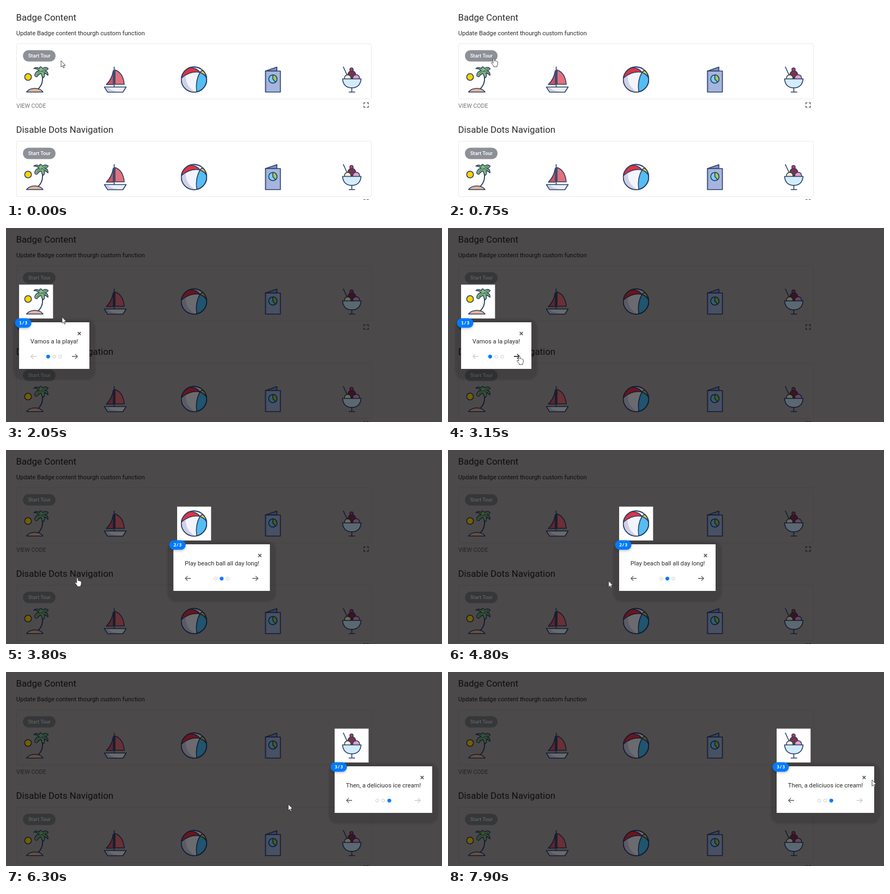
An HTML page that plays this animation: 800x358 px, repeating every 8000 ms.

```html
<!DOCTYPE html>
<html lang="en">
<head>
<meta charset="utf-8">
<title>Guided tour</title>
<style>
  html, body { margin: 0; width: 100%; height: 100%; overflow: hidden; background: #fff; }
  svg { display: block; font-family: Roboto, Arial, sans-serif; }
  text { fill: #2c2c2e; }
  .h { font-size: 16.8px; }
  .p { font-size: 11.2px; }
  .code { font-size: 10.5px; fill: #757575; }
  .card { fill: #fff; stroke: #ebebeb; }
  .pill { fill: #8d9097; }
  .label { fill: #fff; font-size: 9.33px; font-weight: 500; text-anchor: middle; }
  .line { fill: none; stroke: #4a4a4a; stroke-width: 1.2; }
  .ink { stroke: #2b3f66; stroke-width: 1.6; stroke-linejoin: round; stroke-linecap: round; }

  /* One 8 s timeline drives everything */
  .icon, .btn, #mask, #tour, .step, #cursor, #cursor g, .hover { animation: 8s step-end infinite; }
  .icon { --dim: brightness(.44) saturate(1.15); animation-name: dim; }
  .btn { --dim: brightness(.38); animation-name: dim; }
  .icon.first { animation-name: dim-first; }
  .icon.second { animation-name: dim-second; }
  .icon.third { animation-name: dim-third; }
  @keyframes dim { 0% { filter: none } 11.875%, 100% { filter: var(--dim) } }
  @keyframes dim-first { 0% { filter: none } 44.6875%, 100% { filter: var(--dim) } }
  @keyframes dim-second {
    0% { filter: none } 11.875% { filter: var(--dim) }
    44.6875% { filter: none } 74.6875%, 100% { filter: var(--dim) }
  }
  @keyframes dim-third {
    0% { filter: none } 11.875% { filter: var(--dim) } 74.6875%, 100% { filter: none }
  }

  #mask { fill: rgba(5, 0, 4, .714); fill-rule: evenodd; animation-name: mask; }
  @keyframes mask {
    0% { visibility: hidden; transform: none }
    11.875% { visibility: visible; transform: none }
    44.6875% { visibility: visible; transform: translateX(290px) }
    74.6875%, 100% { visibility: visible; transform: translateX(579px) }
  }

  #tour { animation-name: slide; animation-timing-function: ease; }
  @keyframes slide {
    0%, 44.5% { transform: translate(24px, 174px) }
    48.25%, 74.5% { transform: translate(314px, 174px) }
    78.25%, 100% { transform: translate(603px, 174px) }
  }
  .step { visibility: hidden; }
  .step:nth-child(1) { animation-name: step1; }
  .step:nth-child(2) { animation-name: step2; }
  .step:nth-child(3) { animation-name: step3; }
  @keyframes step1 { 11.875% { visibility: visible } 44.375%, 100% { visibility: hidden } }
  @keyframes step2 { 44.375% { visibility: visible } 74.375%, 100% { visibility: hidden } }
  @keyframes step3 { 74.375%, 100% { visibility: visible } }

  .shade { width: calc((var(--w) + 22) * 1px); fill: #000; opacity: .12; filter: blur(1.5px); }
  .panel { width: calc(var(--w) * 1px); fill: #fff; }
  .end { transform: translateX(calc(var(--w) * 1px)); }
  .mid { transform: translateX(calc(var(--w) * .5px)); }
  .arrow { fill: none; stroke: #5e5e5e; stroke-width: 1.3; }
  .off { stroke: #caccce; }
  .hover { animation-name: hover1; }
  .step:nth-child(2) .hover { animation-name: hover2; }
  @keyframes hover1 { 39.375%, 100% { stroke: #000 } }
  @keyframes hover2 { 68.75%, 100% { stroke: #000 } }
  .dot { fill: none; stroke: #caccce; }
  .on { fill: #007aff; stroke: #007aff; }
  .badge rect { fill: #007aff; filter: drop-shadow(0 2px 2px rgba(0, 0, 0, .25)); }
  .badge text { fill: #fff; font: bold 8.5px "Noto Sans Mono", monospace; text-anchor: middle; }

  #cursor { animation-name: move; animation-timing-function: ease-in-out; }
  @keyframes move {
    0%, 1.25% { transform: translate(101px, 101px) }
    9.375%, 18.125% { transform: translate(84px, 96px) }
    26.25%, 28.75% { transform: translate(103px, 165px) }
    38.125%, 50% { transform: translate(131px, 236px) }
    54.375%, 55.625% { transform: translate(190px, 238px) }
    65%, 66.25% { transform: translate(425px, 246px) }
    70.625%, 76.875% { transform: translate(464px, 242px) }
    78.75% { transform: translate(518px, 244px) }
    84.375%, 85% { transform: translate(650px, 235px) }
    95%, 96.25% { transform: translate(775px, 212px) }
    98.75%, 100% { transform: translate(778px, 199px) }
  }
  #cursor g { visibility: hidden; }
  #cursor .point { animation-name: point; }
  #cursor .hand { animation-name: hand; }
  #cursor .stop { animation-name: stop; }
  @keyframes point {
    0% { visibility: visible } 5% { visibility: hidden }
    11.875% { visibility: visible } 39.375% { visibility: hidden }
    50% { visibility: visible } 68.75% { visibility: hidden }
    76.875%, 100% { visibility: visible }
  }
  @keyframes hand {
    5% { visibility: visible } 11.875% { visibility: hidden }
    39.375% { visibility: visible } 50% { visibility: hidden }
    68.75% { visibility: visible } 74.375%, 100% { visibility: hidden }
  }
  @keyframes stop { 74.375% { visibility: visible } 76.875%, 100% { visibility: hidden } }
</style>
</head>
<body>
<svg width="800" height="358">
  <defs>
    <g id="palm" class="ink">
      <circle cx="40.5" cy="131" r="6.2" fill="#ffd400"/>
      <path d="M66 126Q70 143 58.5 153.5" fill="none" stroke-width="1.9"/>
      <path d="M37.5 158.7Q43 152 53 152T68 158.7Z" fill="#e6b595"/>
      <path d="M61 119.5Q57 115 51 115.5Q55 111.5 61.5 115.5Q61 112.5 64 112.3Q66 113 67.5 115.5Q72 111 77.5 115.5Q75 119.5 71 119.5Q78 121 77 128Q73 124 70 124Q72 130 68.5 132.5Q65 129 64.5 124.5Q60 125.5 57 130.5Q51 131 53.5 124.5Q56 120 61 119.5Z" fill="#84ba78" stroke-width="1.4"/>
      <path d="M56 127Q60 121 65 120.5L74 115.5M65 120.5Q71 121 74.5 125" fill="none" stroke-width=".8"/>
    </g>
    <g id="boat" class="ink">
      <path d="M197 119Q194 136 184 145H197Z" fill="#cf5466"/>
      <path d="M200 118Q215 123 217 144.5H200Z" fill="#e2717b"/>
      <path d="M198.5 112.5V149" fill="none"/>
      <path d="M180.5 149.5H220.5L214.5 159H186.5Z" fill="#eef0fa"/>
      <path d="M183 150.5L188 158H205Q190 156 187 150.5Z" fill="#c9cbe2" stroke="none"/>
    </g>
    <g id="ball" class="ink">
      <circle cx="345" cy="135.7" r="23.3" fill="#f3f4fc"/>
      <path d="M322 133Q324 127 330 126Q328 148 348 159A23.3 23.3 0 0 1 322 133Z" fill="#cfd0e6" stroke="none"/>
      <path d="M322 133Q338 119 356 122.5Q350 114 337 113.8A23.3 23.3 0 0 0 322 133Z" fill="#dc3545"/>
      <path d="M356 122.5Q347 138 350 158.5A23.3 23.3 0 0 0 368 133Q365 126 356 122.5Z" fill="#55bdf2"/>
      <path d="M356 122.5Q359 118 362.5 120Q367 125 368 132Q365 126 356 122.5Z" fill="#ffd21f"/>
      <circle cx="345" cy="135.7" r="23.3" fill="none"/>
    </g>
    <g id="leaflet" class="ink">
      <path d="M476 120L497 112.7V120Z" fill="#7f93c4"/>
      <path d="M476 120H503.5V158.8H476Z" fill="#a6b5de"/>
      <path d="M477.5 121.5V157.5" stroke="#8498cb" fill="none"/>
      <circle cx="489.6" cy="134.8" r="7.6" fill="#74d0f5"/>
      <path d="M489.6 127.2A7.6 7.6 0 0 1 494.5 140.6L489.6 134.8Z" fill="#a3cc50"/>
    </g>
    <g id="sundae" class="ink">
      <path d="M619 112.5L627 130" fill="none"/>
      <circle cx="634.5" cy="126.5" r="7" fill="#7f3148"/>
      <circle cx="627" cy="133" r="6" fill="#fbf0c4"/>
      <circle cx="642.5" cy="133" r="6.3" fill="#e79ccb"/>
      <circle cx="634" cy="117.3" r="3" fill="#e0334f"/>
      <path d="M617.5 134.5H651.5Q650 151 634.5 151T617.5 134.5Z" fill="#d3ecfd"/>
      <path d="M634.5 151V158.7M629.5 158.7H640" fill="none"/>
    </g>
    <path id="corners" class="line" d="M656.6 181.5V178.6H659.5M662 178.6H664.9V181.5M664.9 184V186.9H662M659.5 186.9H656.6V184"/>
    <path id="prev" d="M32 63H21.8M26.2 58.6L21.8 63L26.2 67.4"/>
    <path id="next" d="M-32 63H-21.8M-26.2 58.6L-21.8 63L-26.2 67.4"/>
    <path id="close" d="M-21.3 17.9L-15.7 23.5M-15.7 17.9L-21.3 23.5" fill="none" stroke="#555" stroke-width="1.6"/>
    <g id="button">
      <rect class="pill" x="31" y="81.5" width="60" height="21" rx="10.5"/>
      <text class="label" x="61.2" y="95.2">Start Tour</text>
    </g>
  </defs>

  <text class="h" x="18.5" y="26.5">Badge Content</text>
  <text class="p" x="18.7" y="53.7">Update Badge content thourgh custom function</text>
  <rect class="card" x="19.5" y="69.5" width="651" height="102" rx="2"/>
  <text class="code" x="19" y="187.5">VIEW CODE</text>
  <use href="#corners"/>
  <text class="h" x="18.5" y="234.3">Disable Dots Navigation</text>
  <rect class="card" x="19.5" y="249.5" width="651" height="102" rx="2"/>
  <use href="#corners" y="179"/>

  <path id="mask" d="M-800 0H1600V358H-800ZM24 104.5h62.3v62.5h-62.3z"/>

  <g class="btn"><use href="#button"/><use href="#button" y="180"/></g>
  <use class="icon first" href="#palm"/>
  <use class="icon second" href="#ball"/>
  <use class="icon third" href="#sundae"/>
  <g class="icon">
    <use href="#boat"/>
    <use href="#leaflet"/>
    <g transform="translate(0 180)">
      <use href="#palm"/><use href="#boat"/><use href="#ball"/><use href="#leaflet"/><use href="#sundae"/>
    </g>
  </g>

  <g id="tour">
    <g class="step" style="--w:129">
      <rect class="shade" x="-11" y="-6" height="112" rx="16"/>
      <rect class="panel" height="86"/>
      <text class="p" x="20.8" y="38.6">Vamos a la playa!</text>
      <use class="arrow off" href="#prev"/>
      <g class="mid"><circle class="dot on" cx="-11.2" cy="63.3" r="3.1"/><circle class="dot" cy="63.3" r="2.8"/><circle class="dot" cx="11" cy="63.3" r="2.8"/></g>
      <g class="end"><use href="#close"/><use class="arrow hover" href="#next"/></g>
      <g class="badge"><rect x="-7.5" y="-7.5" width="30" height="17.5" rx="8.75"/><text x="7.6" y="4.4">1/3</text></g>
    </g>
    <g class="step" style="--w:177">
      <rect class="shade" x="-11" y="-6" height="112" rx="16"/>
      <rect class="panel" height="86"/>
      <text class="p" x="20.8" y="38.6">Play beach ball all day long!</text>
      <use class="arrow" href="#prev"/>
      <g class="mid"><circle class="dot" cx="-11" cy="63.3" r="2.8"/><circle class="dot on" cy="63.3" r="3.1"/><circle class="dot" cx="11" cy="63.3" r="2.8"/></g>
      <g class="end"><use href="#close"/><use class="arrow hover" href="#next"/></g>
      <g class="badge"><rect x="-7.5" y="-7.5" width="30" height="17.5" rx="8.75"/><text x="7.6" y="4.4">2/3</text></g>
    </g>
    <g class="step" style="--w:179">
      <rect class="shade" x="-11" y="-6" height="112" rx="16"/>
      <rect class="panel" height="86"/>
      <text class="p" x="20.8" y="38.6">Then, a deliciuos ice cream!</text>
      <use class="arrow" href="#prev"/>
      <g class="mid"><circle class="dot" cx="-11.3" cy="63.3" r="2.8"/><circle class="dot" cx="-.3" cy="63.3" r="2.8"/><circle class="dot on" cx="10.8" cy="63.3" r="3.1"/></g>
      <g class="end"><use href="#close"/><use class="arrow off" href="#next"/></g>
      <g class="badge"><rect x="-7.5" y="-7.5" width="30" height="17.5" rx="8.75"/><text x="7.6" y="4.4">3/3</text></g>
    </g>
  </g>

  <g id="cursor" fill="#fff" stroke="#222" stroke-width=".8" stroke-linejoin="round">
    <g class="point"><path d="M0 0V11.5L2.6 9.2L4.4 13.2L6.2 12.4L4.4 8.5H8Z"/></g>
    <g class="hand"><path d="M-1.3 1.2Q0 -1 1.2 1.2V5.2Q2.5 4.3 3.4 5.6Q4.6 4.8 5.4 6.2Q7 5.8 7.2 7.6V11Q7 13 6 14V16H-.5V14.4L-4.4 9.4Q-4.2 7.4 -2.6 8.4L-1.3 9.6Z"/></g>
    <g class="stop" fill="none" stroke="#c4152f" stroke-width="1.9"><circle r="4.6" fill="#fff"/><path d="M-3.2 -3.2L3.2 3.2"/></g>
  </g>
</svg>
</body>
</html>
```
